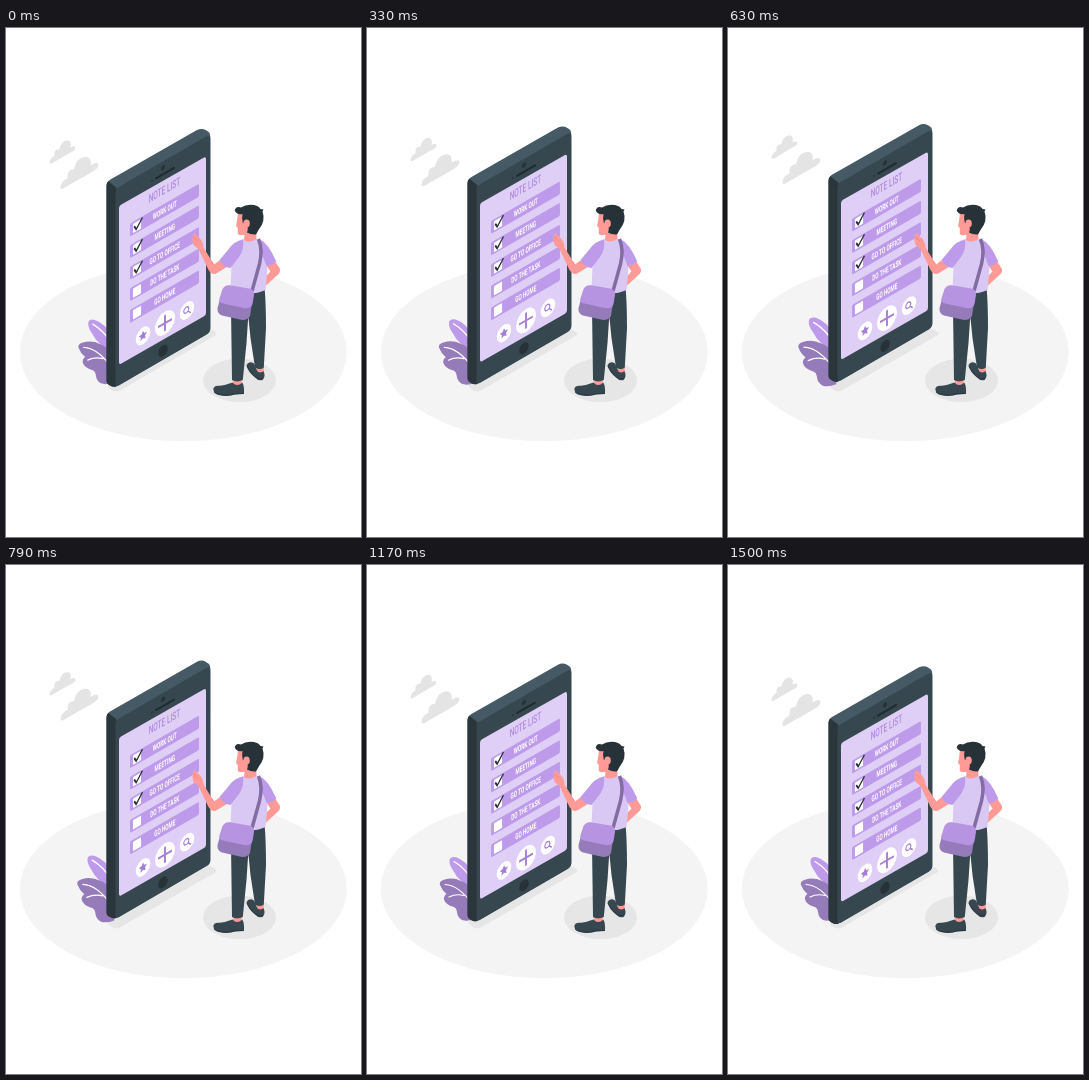
Animation, 355 px wide and 509 px high, one loop 1.54 s. Source, as an HTML page:

```html
<!DOCTYPE html>
<html lang="en">
<head>
<meta charset="utf-8">
<title>Note list</title>
<style>
html, body { margin: 0; width: 100%; height: 100%; overflow: hidden; background: #fff; }
svg { display: block; width: 100vw; height: 100vh; }
text { font-family: Roboto, "Liberation Sans", sans-serif; text-anchor: middle; }
</style>
</head>
<body>
<svg viewBox="0 0 355 509">
  <ellipse cx="177.3" cy="324" rx="163.5" ry="89.3" fill="#f4f4f4"/>
  <ellipse cx="233.5" cy="352.3" rx="36.5" ry="21.8" fill="#e6e6e6"/>
  <path d="M101 357 L200 300 Q212 303 210 307 L114 362.500 Q109 365 104 361Z" fill="#e6e6e6"/>

  <g id="clouds" fill="#e4e4e4">
    <path d="M43.500 135 Q44 130.500 48.500 128 Q47.500 121 53.500 121.500 Q55 113 61.500 112.500 Q66 113 64.500 119.500 Q70 117 69.500 121 Q68 123.500 64 125 L45.500 135.800 Q43.500 136.500 43.500 135Z"/>
    <path d="M54.500 159.500 Q55 153.500 61.500 150.500 Q60.500 142 68 141.500 Q70 130.500 79 129 Q86 129 84.500 137.500 Q92 133 92.500 137 Q92 141 85.500 144.500 L57 160.800 Q54.500 162 54.500 159.500Z"/>
  </g>

  <g id="plant" fill="none" stroke-linecap="round">
    <path d="M82.500 295 Q83.500 291 89 292.300 Q99 295.500 106 308 V324 Q91 316 86.500 306 Q82 300 82.500 295Z" fill="#bd9bea"/>
    <path d="M87 296.500 Q98 303 106 316" stroke="#fff" stroke-width="1.300"/>
    <path d="M73 320 Q71.500 316.500 77 314.700 Q86 312 94 316 Q101 318 108 328 V354 Q100 357 95 355 Q90.500 352.500 90 347 Q89.500 342.500 86 341.800 Q78.500 339.500 77 334.500 Q76.500 331 79.500 329 Q75 325.500 73 320Z" fill="#957bba"/>
    <path d="M78 319.500 Q92 320 106 340 M82 332 Q89 328.500 97 330.500" stroke="#fff" stroke-width="1.200"/>
  </g>

  <g id="phone">
    <path d="M100.500 158 Q100.500 154 104 152 L191 102.300 Q196 100 200 102.500 L203 104.500 Q204.300 106 204.300 109 V300.500 Q204.300 304.500 200.500 306.700 L113 357.500 Q108 360.300 104 357.700 Q100.500 356 100.500 353Z" fill="#455a64"/>
    <path d="M100.500 158 Q100.500 154.500 102.500 153.500 L110.500 160 V358.700 Q107 359.700 104 357.700 Q100.500 356 100.500 353Z" fill="#2a363c"/>
    <path d="M109.500 165 Q109.500 161 113 159 L200 108.700 Q204.300 106.500 204.300 111 V300.500 Q204.300 304.500 200.500 306.700 L113 357.500 Q109.500 359.500 109.500 354.500Z" fill="#37474f"/>
    <path d="M113 180.500 Q113 178 115 177 L198 129.800 Q200 129 200 131.500 V285 Q200 287.300 198 288.500 L115 336 Q113 337 113 334.500Z" fill="#dfcff6"/>
    <path d="M150 150.700 L168 140.200" stroke="#202b31" stroke-width="2" stroke-linecap="round"/>
    <g id="ui"></g>
  </g>

  <g id="man">
    <g fill="#ff9a96">
      <path d="M226.500 350 H236 L235.500 358 H227.500Z M250 338 H258 L257.500 347 H252Z"/>
      <path d="M260 237 L269.500 234 L274 241 Q274.500 244.500 271.500 247 L260 257.500 L258.500 249.500 L264.500 243.500Z"/>
    </g>
    <g fill="#37474f">
      <path d="M225 280 L226 352 Q231 354.800 236.800 352 L240.500 315 L242 292 L246 278Z"/>
      <path d="M238 286 L242.500 290 L244.500 310 L249 339.500 Q254 342.500 257.800 339.500 L260 300 Q260 275 258.500 259 L240 262Z"/>
      <path d="M207.300 361 Q208 357 214 357.800 Q220 357 226.500 354.500 Q231 359.500 236.300 354.500 Q238.500 358 238 366 L229 366.500 Q224 368.500 217 367.800 Q207.500 367 207.300 361Z"/>
      <path d="M240.500 337 Q243 332.500 248 335.500 L251.500 343.500 Q255 345.500 257.500 343 Q260 349 256.500 352 Q252 353 249 349.500 Q242 344 240.500 337Z"/>
    </g>
    <path d="M208 364 Q211 367 219 367 Q225 367.300 229 365.800 L238 365.300 M240.800 338 Q243 344 249.500 349 Q252.500 352 257 350.500" fill="none" stroke="#263238" stroke-width=".8"/>
    <path d="M232 213 Q240 209 250 210.500 Q259 213 260.500 222 L261.500 240 L259.500 262 Q244 269 224.500 262 L225.500 237Z" fill="#d9c8f3"/>
    <path d="M254.500 211.800 Q262 215 270.300 233.500 Q266.500 237.500 260.500 238 L256 226Z" fill="#bd9bea"/>
    <path d="M216 230.500 L208 236.500 L197.500 219.500 Q197.500 213.500 193.500 210 L189 205.500 Q186 205.500 187 209 L186.300 212 L187.500 217 L192.500 221 L202.500 242 Q206.500 247.800 211 245 L222.500 238Z" fill="#ff9a96"/>
    <path d="M187.500 209 L192 213.500 M207.500 236.500 L205.500 233" stroke="#ef7f80" stroke-width=".7"/>
    <path d="M237 211.700 Q227.500 213 222 222 L213.500 232 Q217 239.500 224.500 240 L233 229 Q238.500 221 237 211.700Z" fill="#bd9bea"/>
    <path d="M232 185 L231 193 L230 198 L231.800 200 L231.800 206 Q234 208 238.500 206.800 L238 212 Q243 215.500 250.500 211 L250 198 L241 185Z" fill="#ff9a96"/>
    <path d="M228.700 182.500 Q230 177.800 235 179.500 Q240 176 248 177 Q253 178 254.500 181 L257.500 181.500 L256.500 183.500 Q260 193 252.500 202 L250 206.500 Q245 207 241 204.500 Q243 200 240 195.500 L236.800 195 Q235.500 190 236.500 186 Q230.500 187 228.700 182.500Z" fill="#263238"/>
    <ellipse cx="240.600" cy="195.500" rx="3.200" ry="3.900" fill="#ff9a96"/>
    <path d="M252.500 211 Q257 222 253.500 236 L246 263" fill="none" stroke="#826ca2" stroke-width="3.500"/>
    <path d="M216 264 L247 268 L244 288 Q241.500 292.500 235 291.800 L216 287.500 Q211 285.500 211.500 280Z" fill="#957bba"/>
    <path d="M216.500 261 Q219 256.500 224 257.300 L244.500 260.800 Q248.300 262.500 248 267 L246.500 276 Q244.500 281.500 238 280 L217 275.500 Q212.500 274.500 213.300 271Z" fill="#b694e1"/>
  </g>
</svg>
<script>
const LOOP = 1540, PHASE = 30, LIFT = 6;
const $ = id => document.getElementById(id);
const WHITE = "#fff", LILAC = "#bd9bea", VIOLET = "#a57ed6", DARK = "#263238";

// places flat artwork on the tilted front of the phone
const iso = (x, y, body) => `<g transform="matrix(.866 -.5 0 1 ${x} ${y})">${body}</g>`;
const disc = (r, fill) => `<circle r="${r}" fill="${fill}"/>`;
const label = (str, size, fill, weight) =>
  `<text transform="scale(.66 1)" y="${size * 0.355}" font-size="${size}" font-weight="${weight}" fill="${fill}">${str}</text>`;

function star(r) {
  const pts = Array.from({ length: 10 }, (_, i) => {
    const a = i * Math.PI / 5, d = i % 2 ? r * 0.5 : r;
    return `${(d * Math.sin(a)).toFixed(2)},${(-d * Math.cos(a)).toFixed(2)}`;
  });
  return `<polygon points="${pts.join(" ")}" fill="${VIOLET}"/>`;
}

function row(str, i) {
  const y = 182.400 + i * 21.600;
  const tick = `<path d="M-3.200 -1.300 L-.8 2.700 L6.300 -5.500" fill="none" stroke="${DARK}" stroke-width="1.800"/>`;
  return iso(158.500, y, `<rect x="-39.800" y="-6.500" width="79.600" height="13" rx="1.500" fill="${LILAC}"/>`)
    + iso(158.800, y - 0.200, label(str, 8.300, WHITE, 600))
    + iso(131, y + 16, `<rect x="-4.700" y="-4.700" width="9.400" height="9.400" rx=".8" fill="${WHITE}"/>` + (i < 3 ? tick : ""));
}

$("ui").innerHTML =
  iso(157, 140, disc(2.400, DARK)) +
  iso(146, 152.800, disc(1, DARK)) +
  iso(158.500, 162, label("NOTE LIST", 11.500, "#b18ae0", 500)) +
  ["WORK OUT", "MEETING", "GO TO OFFICE", "DO THE TASK", "GO HOME"].map(row).join("") +
  iso(137, 308, disc(8.400, WHITE) + star(5)) +
  iso(159, 295.300, disc(11.500, WHITE) + `<path d="M-8 0 H8 M0 -8 V8" stroke="${VIOLET}" stroke-width="2.200"/>`) +
  iso(181, 282.700, disc(8.400, WHITE) +
    `<g fill="none" stroke="${VIOLET}" stroke-width="1.300"><circle cx="-.8" cy="-.8" r="2.900"/><path d="M1.300 1.300 L4.300 4.300"/></g>`) +
  iso(157, 323, disc(5.400, DARK));

// two heartbeats, then a rest
const BEAT = [[0, 0], [0.14, 1], [0.28, 0], [0.42, 1], [0.7, 0], [1, 0]];
function beat(p) {
  const i = BEAT.findIndex(k => k[0] > p);
  const [a, u] = BEAT[i - 1], [b, v] = BEAT[i];
  return u + (v - u) * (p - a) / (b - a);
}

function draw(ms) {
  const p = ((ms + PHASE) % LOOP) / LOOP;
  const rise = `translate(0 ${-LIFT * (1 - Math.abs(2 * p - 1))})`;
  const s = 1 + 0.08 * beat(p);
  $("phone").setAttribute("transform", rise);
  $("clouds").setAttribute("transform", rise);
  $("plant").setAttribute("transform", `translate(104 324) scale(${s}) translate(-104 -324)`);
}

const start = performance.now();
function tick() {
  draw(Math.max(0, performance.now() - start));
  requestAnimationFrame(tick);
}
draw(0);
requestAnimationFrame(tick);
</script>
</body>
</html>
```
